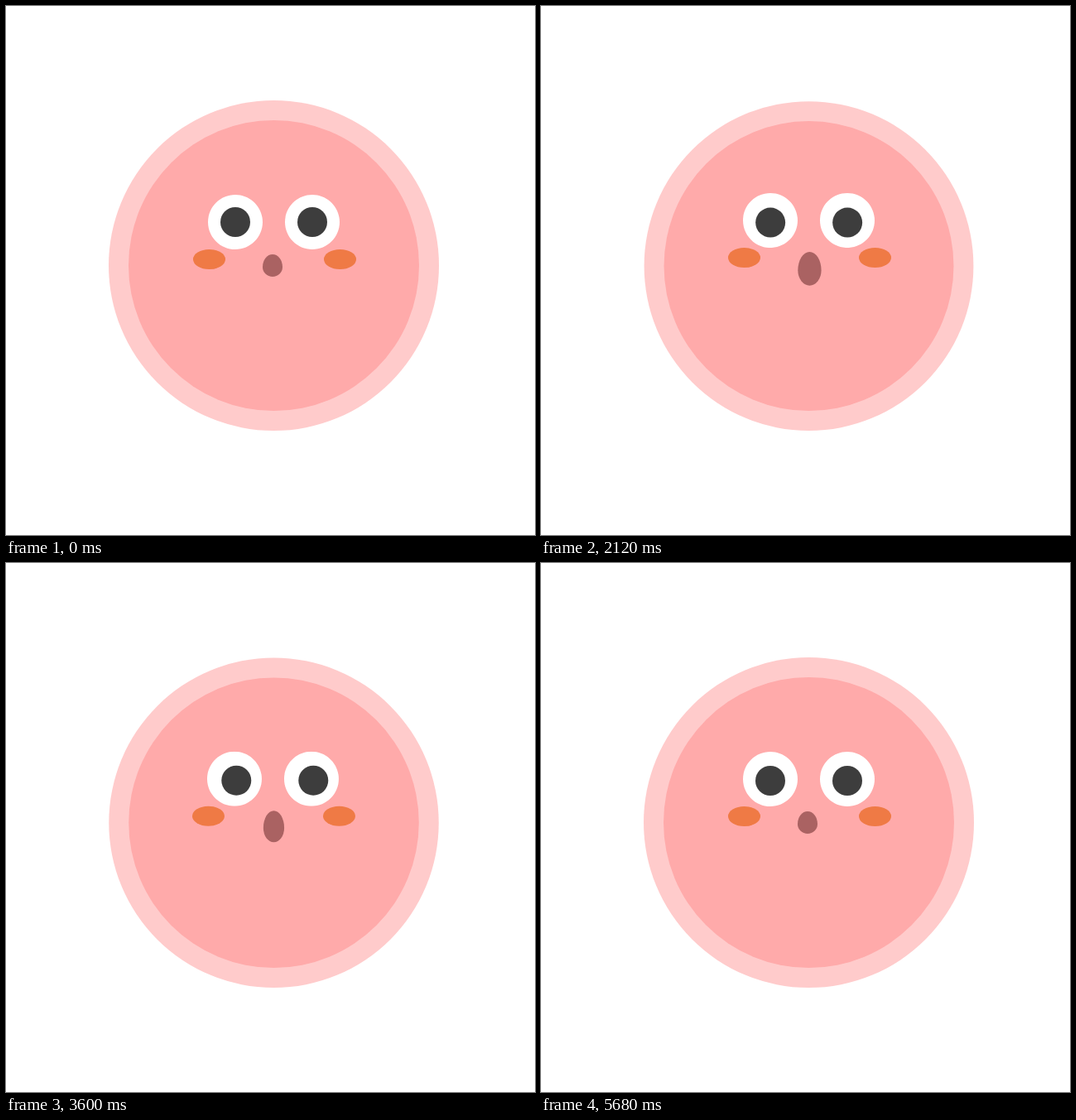
An HTML page that plays this animation: 639x639 px, repeating every 5.72 s.

```html
<!DOCTYPE html>
<html>
<head>
<meta charset="utf-8">
<style>
html, body { margin: 0; width: 100%; height: 100%; overflow: hidden; background: #fff; }
svg { display: block; width: 100%; height: 100%; }
</style>
</head>
<body>
<svg viewBox="0 0 639 639">
  <defs>
    <clipPath id="lids"><path id="lidL"/><path id="lidR"/></clipPath>
  </defs>
  <g id="body">
    <circle cx="323.5" cy="313.5" r="199.5" fill="#ffcbcb"/>
    <circle cx="323.5" cy="313.5" r="175.5" fill="#ffaaaa"/>
  </g>
  <g id="face">
    <g fill="#ef7a45">
      <ellipse cx="245.5" cy="306" rx="19.5" ry="12"/>
      <ellipse cx="403.5" cy="306" rx="19.5" ry="12"/>
    </g>
    <path id="mouth" fill="#aa6262"/>
    <g clip-path="url(#lids)">
      <rect x="230" y="220" width="190" height="82" fill="#fff"/>
      <g id="pupils" fill="#3d3d3d">
        <circle cx="277" cy="261" r="18"/>
        <circle cx="370" cy="261" r="18"/>
      </g>
    </g>
  </g>
</svg>
<script>
const LOOP = 5720, STEP = 40;
const el = id => document.getElementById(id);
const move = (id, value) => el(id).setAttribute('transform', value);
const shape = (id, path) => el(id).setAttribute('d', path);
const mix = (a, b, k) => a + (b - a) * k;
const ease = k => (1 - Math.cos(Math.PI * Math.min(1, Math.max(0, k)))) / 2;

// rises to 1 from time a on, falls back to 0 from time b on
const pulse = (t, a, b, span = 340) => ease((t - a) / span) - ease((t - b) / span);

// wandering pupils: time, x, y
const looks = [
  [0, 0, 0], [1600, 0, 5], [2640, .3, 0], [3600, 2.3, 2],
  [4320, -1.5, -.5], [5400, 0, -3], [5680, 0, 2]
];
function gaze(t) {
  const i = Math.max(1, looks.findIndex(look => look[0] >= t));
  const [from, x0, y0] = looks[i - 1], [to, x1, y1] = looks[i];
  const k = ease((t - from) / (to - from));
  return [mix(x0, x1, k), mix(y0, y1, k)];
}

// mouths: centre x, centre y, half width, half height
const rest = [322, 313.5, 12, 13.5];
const gasping = [324, 329.3, 33, 36.3];
const oval = [324.5, 318.5, 12.6, 19];

function egg([x, y, rx, ry]) {
  const sag = rx * .14;
  return `M${x - rx} ${y + sag}a${rx} ${ry + sag} 0 0 1 ${2 * rx} 0a${rx} ${ry - sag} 0 0 1 ${-2 * rx} 0Z`;
}

// round when open, pointed at the corners as it closes
function eye(x, open) {
  const y = 261, h = 33 * open, v = 18.2 * open, inner = mix(19, 33, open);
  const half = s => `C${x - s * inner} ${y - s * v} ${x - s * 18.2} ${y - s * h} ${x} ${y - s * h}
    S${x + s * inner} ${y - s * v} ${x + s * 33} ${y}`;
  return `M${x - 33} ${y}${half(1)}${half(-1)}Z`;
}

function draw(now) {
  const t = Math.floor(now % LOOP / STEP) * STEP;
  const gasp = pulse(t, 940, 1840);
  const left = pulse(t, 2446, 3296);
  const right = pulse(t, 4040, 4900);
  const stretch = pulse(t, 1840, 5240);
  const open = 1 - pulse(t, 340, 570, 200);

  const size = 1 - .04 * gasp - .05 * (left + right);
  move('body', `translate(323.5 505) scale(${size}) translate(-323.5 -505)`);
  move('face', `translate(${37.5 * (right - left)} ${-26 * gasp - 10 * left - 17.4 * right})`);
  move('pupils', `translate(${gaze(t)})`);
  shape('mouth', egg(rest.map((v, i) => v + gasp * (gasping[i] - v) + stretch * (oval[i] - v))));
  shape('lidL', eye(277, open));
  shape('lidR', eye(370, open));
}

const start = performance.now();
function tick() {
  draw(performance.now() - start);
  requestAnimationFrame(tick);
}
tick();
</script>
</body>
</html>
```
